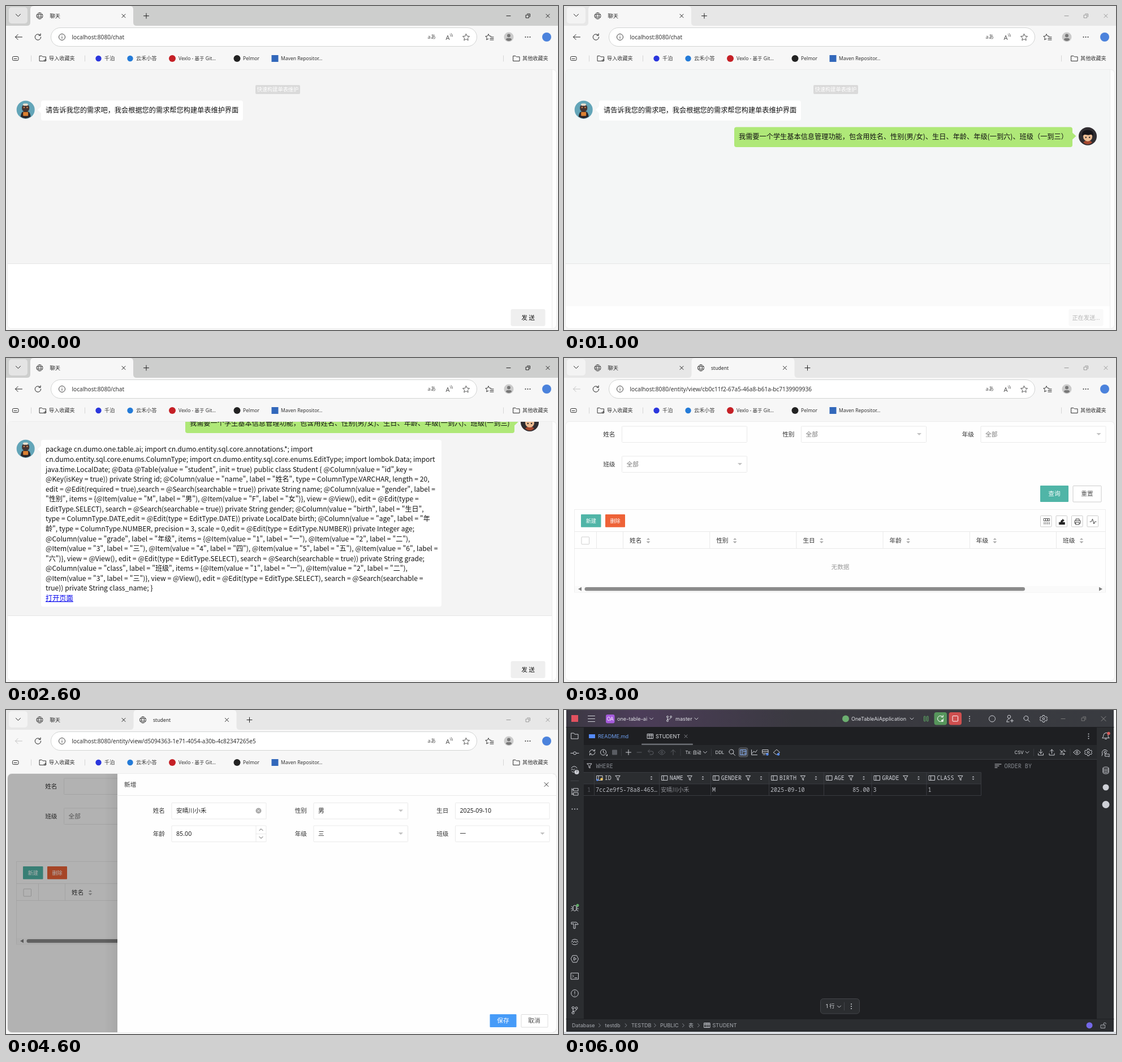
An HTML page that plays this animation: 976x574 px, repeating every 7 s.

```html
<!DOCTYPE html>
<html lang="zh-CN">
<head>
<meta charset="utf-8">
<title>Chat to table</title>
<style>
html, body { margin: 0; width: 100%; height: 100%; overflow: hidden; background: #f7f7f7; }
svg { display: block; font-family: "Noto Sans CJK SC", "Noto Sans CJK", sans-serif; }
.ui { font-family: "Noto Sans", "Noto Sans CJK SC", sans-serif; }
.ide { font-family: Inter, "Noto Sans CJK SC", sans-serif; }
.mono { font-family: "Noto Sans Mono", "Noto Sans CJK SC", monospace; }
.code { word-spacing: .2px; }
</style>
</head>
<body>
<svg id="stage" width="976" height="574" viewBox="0 0 976 574"></svg>
<script>
const MID = 'text-anchor="middle"', END = 'text-anchor="end"', UI = 'class="ui"', MONO = 'class="mono"';
const TEAL = '#50b5a7', LINE = '#e9e9e9', PERSON = '安晴川小禾';

// Text is placed by its visual centre line.
const T = (x, y, text, size = 10.67, fill = '#222', attrs = '') =>
  `<text x="${x}" y="${y + size * .37}" font-size="${size}" fill="${fill}" ${attrs}>${text}</text>`;
const R = (x, y, w, h, fill = 'none', r = 0, stroke = 'none') =>
  `<rect x="${x}" y="${y}" width="${w}" height="${h}" rx="${r}" fill="${fill}" stroke="${stroke}"/>`;
const C = (x, y, r, fill = 'none', stroke = 'none') =>
  `<circle cx="${x}" cy="${y}" r="${r}" fill="${fill}" stroke="${stroke}"/>`;
const P = (x, y, d, stroke = '#333', fill = 'none', w = 1) =>
  `<path transform="translate(${x} ${y})" d="${d}" stroke="${stroke}" fill="${fill}" stroke-width="${w}" stroke-linecap="round" stroke-linejoin="round"/>`;
const H = (x, y, w, color = LINE) => P(x, y, `M0 0h${w}`, color);
const V = (x, y, h, color = LINE) => P(x, y, `M0 0v${h}`, color);
const each = (list, f) => list.map(f).join('');

const D = {
  cross: 'M-3-3l6 6m0-6l-6 6', plus: 'M-4.5 0h9M0-4.5v9', minus: 'M-4 0h8', chevron: 'M-3-1.5l3 3 3-3',
  crumb: 'M-1.5-3l3 3-3 3', back: 'M6 0h-12l4.5-4.5m-4.5 4.5l4.5 4.5', folder: 'M-5.5-4.5h4l1.5 1.5h5.5v7.5h-11z',
  reload: 'M4.2-3A5.2 5.2 0 1 0 5.2 0M4.6-6v3.2h-3.2', globe: 'M-5.5 0a5.5 5.5 0 1 0 11 0a5.5 5.5 0 1 0-11 0M0-5.5c-3.4 3-3.4 8 0 11c3.4-3 3.4-8 0-11M-5-2h10M-5 2h10',
  star: 'M0-6l1.8 3.8 4.2.5-3.1 2.9.8 4.1L0 3.3l-3.7 2 .8-4.1L-6-1.7l4.2-.5z',
  restore: 'M-3.5-1.5h5v5h-5zM-1.5-3.5h5v5', down: 'M-4-2h8l-4 4z', up: 'M-3 1.5h6l-3-3z',
  search: 'M-5-1a4 4 0 1 0 8 0a4 4 0 1 0-8 0M2 2l3.5 3.5', funnel: 'M-4-4h8l-3 4v4l-2-1.2v-2.8z',
  branch: 'M-3-2v4M-3 1q6 0 6-3M-4.5-3.5a1.5 1.5 0 1 0 3 0a1.5 1.5 0 1 0-3 0M-4.5 3.5a1.5 1.5 0 1 0 3 0a1.5 1.5 0 1 0-3 0M1.5-3.5a1.5 1.5 0 1 0 3 0a1.5 1.5 0 1 0-3 0',
  grid: 'M-5-4h10v8h-10zM-5-1.5h10M-1.7-4v8M1.7-4v8', column: 'M-5-4h10v8h-10zM-2-4v8',
  gear: 'M-1.3-6h2.6l.6 2 1.4.8 2-.5 1.3 2.3-1.5 1.4 1.5 1.4-1.3 2.3-2-.5-1.4.8-.6 2h-2.6l-.6-2-1.4-.8-2 .5-1.3-2.3 1.5-1.4-1.5-1.4 1.3-2.3 2 .5 1.4-.8zM-1.8 0a1.8 1.8 0 1 0 3.6 0a1.8 1.8 0 1 0-3.6 0',
  eye: 'M-6 0q6-8.5 12 0q-6 8.5-12 0M-1.7 0a1.7 1.7 0 1 0 3.4 0a1.7 1.7 0 1 0-3.4 0',
  save: 'M0-5v7m-3-3l3 3 3-3M-4.5 2v3h9v-3', load: 'M0 2v-7m-3 3l3-3 3 3M-4.5 2v3h9v-3',
  list: 'M-5-3h11M-5 0h7M-5 3h4'
};

function windowButtons(y, color) {
  return P(888, y, 'M-3 0h7', color) + P(923, y, D.restore, color) + P(958, y, D.cross, color);
}

function tab(x, title, active) {
  const shape = active ? P(x, 0, 'M-6 35q6 0 6-6V6q0-6 6-6H176q6 0 6 6V29q0 6 6 6z', 'none', '#f7f7f7') : '';
  return shape + P(x + 16.5, 17.5, D.globe, '#444') + P(x + 165, 17.5, D.cross, '#222')
    + T(x + 34.5, 17.5, title, title === '聊天' ? 9.2 : 8.6, '#222', UI);
}

function browser(focused, url, tabs = 1) {
  const ink = '#333', bookmark = (x, text, size = 9.14) => T(x, 93, text, size, ink, UI);
  return R(0, 0, 976, 574, '#f7f7f7') + R(0, 0, 976, 35, focused ? '#cdcecd' : '#e7e7e7')
    + R(5, 2, 33, 29, focused ? '#e4e4e4' : '#f3f3f3', 5) + P(21.5, 16.5, 'M-4-2l4 4 4-4', '#222')
    + tab(43, '聊天', tabs === 1) + (tabs > 1 ? tab(225.5, 'student', true) : '')
    + P(65.5 + tabs * 182.5, 17.5, D.plus, '#222') + windowButtons(17.5, focused ? '#222' : '#999')
    + P(22.5, 55, D.back, tabs > 1 ? '#c4c4c4' : '#222') + P(56.5, 55, D.reload, '#222')
    + R(79.5, 38.5, 753, 33, '#fff', 16.5, '#d2d4d3')
    + C(99, 55, 5.5, 'none', '#444') + P(99, 55, 'M0-.5v3M0-2.6v.1', '#444')
    + T(116.5, 55, url, 10.1, '#333', UI) + T(745.5, 55, 'aあ', 9.2, '#555', UI) + T(777.5, 55.5, 'A', 11, '#555', UI)
    + P(785, 52, 'M0-2q2 1 2 4M2-3.5q2.5 2 2.5 5.5', '#666') + P(813.5, 55.5, D.star, '#555')
    + P(854, 55, 'M-1-5l1.5 3 3 .4M-1-5l-1.7 3.2-3.5.5 2.5 2.4-.6 3.8 3.3-1.8M3 0h5M2 2.5h6M2 5h6', '#333')
    + C(889, 55, 8.5, '#cbcbcb') + C(889, 52.5, 3, '#777') + P(889, 60, 'M-5 0q0-3 3-3h4q3 0 3 3q-5 4-10 0', 'none', '#777')
    + each([918.5, 922.5, 926.5], x => C(x, 55, 1, '#333')) + C(956, 55, 8, '#4b82dc')
    + R(11.5, 89.5, 10.5, 7, 'none', 2, ink) + H(14, 93.5, 5, ink)
    + each([44.5, 139.5, 879.5], x => V(x, 88, 10, '#d5d5d5'))
    + P(65, 93, D.folder, ink) + P(69, 96, 'M-2 0h4m-2-2l2 2-2 2', ink) + bookmark(76, '导入收藏夹')
    + C(163.5, 93, 5.2, '#2b36dd') + bookmark(174, '千泊')
    + C(219.5, 93, 5.2, '#247bd8') + bookmark(230, '云禾小答')
    + C(294, 93, 6, '#c52026') + bookmark(305, 'Vexlo - 基于 Git...', 8.5)
    + C(408.5, 93, 6, '#222') + bookmark(419, 'Pelmor', 8.6)
    + R(469.5, 87, 12, 12, '#3268bb') + bookmark(486, 'Maven Repositor...', 8.55)
    + P(902.5, 93, D.folder, ink) + bookmark(913, '其他收藏夹')
    + R(2.5, 112.5, 971, 459, '#fefefe', 7, '#ececec');
}

const inPage = content => `<clipPath id="page"><rect x="3" y="113" width="970" height="458" rx="7"/></clipPath><g clip-path="url(#page)">${content}</g>`;

const robot = y => C(34.7, y, 16, '#63a5b8') + P(34.7, y, 'M-9 12q1-10 9-10t9 10q-9 7-18 0', 'none', '#29262a')
  + R(28.2, y - 9, 13, 12, '#443331', 5) + R(30, y - 11, 9, 4, '#e8dfcf', 2)
  + C(32, y - 4, 1.3, '#d9894f') + C(37.5, y - 4, 1.3, '#d9894f') + R(30.2, y + 4, 9, 7, '#dc8131', 1);
const kid = y => C(926, y, 16, '#302d31') + P(926, y, 'M-8 11q8-8 16 0q-8 7-16 0', 'none', '#a4482f')
  + C(926, y + 1, 8, '#edbd94') + P(926, y, 'M-10-1q-1-10 10-10t10 10l-4-2-5 1-6-1z', 'none', '#17151a')
  + C(922.8, y + 2, 1.2, '#222') + C(929.2, y + 2, 1.2, '#222');
const leftBubble = (y, w, h) => R(62, y, w, h, '#fff', 4) + P(62, y + 16.5, 'M0-6l-6 6 6 6z', 'none', '#fff');
const rightBubble = (x, y) => R(x, y, 899 - x, 35.5, '#afe878', 4) + P(899, y + 16, 'M0-6l6.5 6-6.5 6z', 'none', '#afe878');
const request = '我需要一个学生基本信息管理功能，包含用姓名、性别(男/女)、生日、年龄、年级(一到六)、班级';

function chat(content, sending) {
  return browser(!sending, 'localhost:8080/chat') + inPage(
    R(3, 113, 962, 344, sending ? '#f4f6f6' : '#f4f4f4') + content
    + R(3, 457, 962, 114, '#fff') + (sending ? R(3, 457, 962, 75, '#fafafa') : '')
    + H(3, 456.5, 962, '#e6e6e6') + V(965.5, 113, 458, '#ededed')
    + R(892.5, 537, 61, 30, sending ? '#f9f9f9' : '#efefef', 3)
    + T(923, 552, sending ? '正在发送...' : '发 送', sending ? 10.2 : 10.67, sending ? '#b5b5b5' : '#111', MID));
}

const greeting = R(441, 140, 79, 16, '#dadada', 2) + T(480.5, 148, '快速构建单表维护', 9.2, '#fff', MID)
  + robot(183.7) + leftBubble(167.5, 357, 35.5)
  + T(70, 184.7, '请告诉我您的需求吧，我会根据您的需求帮您构建单表维护界面', 12.19, '#111');
const question = rightBubble(301, 214.5) + T(309, 231.7, request + '（一到三）', 12.19, '#111') + kid(230.7);

const reply = `package cn.dumo.one.table.ai; import cn.dumo.entity.sql.core.annotations.*; import
cn.dumo.entity.sql.core.enums.ColumnType; import cn.dumo.entity.sql.core.enums.EditType; import lombok.Data; import
java.time.LocalDate; @Data @Table(value = "student", init = true) public class Student { @Column(value = "id",key =
@Key(isKey = true)) private String id; @Column(value = "name", label = "姓名", type = ColumnType.VARCHAR, length = 20,
edit = @Edit(required = true),search = @Search(searchable = true)) private String name; @Column(value = "gender", label =
"性别", items = {@Item(value = "M", label = "男"), @Item(value = "F", label = "女")}, view = @View(), edit = @Edit(type =
EditType.SELECT), search = @Search(searchable = true)) private String gender; @Column(value = "birth", label = "生日",
type = ColumnType.DATE,edit = @Edit(type = EditType.DATE)) private LocalDate birth; @Column(value = "age", label = "年
龄", type = ColumnType.NUMBER, precision = 3, scale = 0,edit = @Edit(type = EditType.NUMBER)) private Integer age;
@Column(value = "grade", label = "年级", items = {@Item(value = "1", label = "一"), @Item(value = "2", label = "二"),
@Item(value = "3", label = "三"), @Item(value = "4", label = "四"), @Item(value = "5", label = "五"), @Item(value = "6", label =
"六")}, view = @View(), edit = @Edit(type = EditType.SELECT), search = @Search(searchable = true)) private String grade;
@Column(value = "class", label = "班级", items = {@Item(value = "1", label = "一"), @Item(value = "2", label = "二"),
@Item(value = "3", label = "三")}, view = @View(), edit = @Edit(type = EditType.SELECT), search = @Search(searchable =
true)) private String class_name; }`.split('\n');

const answer = () => rightBubble(317, 97.5) + T(325, 115.5, request + '(一到三)', 12.19, '#111') + kid(114)
  + robot(160.7) + leftBubble(145, 708, 295.5)
  + each(reply, (line, i) => T(70, 162 + i * 17.57, line, 12.07, '#111', 'class="code"'))
  + T(70, 425.5, '打开页面', 12.19, '#00e', 'text-decoration="underline"');

const box = (x, y, w, h = 28.5, stroke = LINE) => R(x + .5, y + .5, w, h, '#fff', 1, stroke);
const button = (x, y, w, h, text, fill, size = 10.67) => R(x, y, w, h, fill, 1) + T(x + w / 2, y + h / 2, text, size, '#fff', MID);
const field = (x, y, w, label, value = '', select = true, color = '#222') => T(x - 11.5, y + 14.3, label, 10.67, '#333', END)
  + box(x, y, w) + T(x + 8.5, y + 14.5, value, 10.67, color, UI) + (select ? P(x + w - 12, y + 14.5, D.down, 'none', '#c2c2c2') : '');
const checkbox = y => box(30.5, y, 13.5, 13, '#cfcfcf');

function table(filled) {
  const bottom = filled ? 379 : 415, bar = bottom - 5.7, rowEnd = filled ? 367.5 : 337.5;
  const columns = ['姓名', '性别', '生日', '年龄', '年级', '班级'], cells = [PERSON, '男', '2025-09-10', '85', '三'];
  const left = i => 104.5 + i * 153.2;
  const filters = field(102, 120.5, 221, '姓名', '', false) + field(419, 120.5, 221, '性别', '全部', true, '#777')
    + field(736.5, 120.5, 221, '年级', '全部', true, '#777') + field(102, 173.5, 221, '班级', '全部', true, '#777');
  const tools = each([842, 869.5, 897, 924.5], x => box(x, 279, 19.5, 19.5, '#ccc'))
    + P(853, 289.5, 'M-4.5-5h3v4h-3zM-1-5h3v4h-3zM3-5h2.5v4h-2.5zM-4 1.5v3.5M-1 1.5v3.5M2 1.5v3.5M5 1.5v3.5', '#444', 'none', .9)
    + P(880.5, 290, 'M-5 1h10v4h-10zM-2 1v-2q0-2 3-2v-2l3 3-3 2v1', '#222', '#222', .5)
    + P(908, 290, 'M-3-2v-3h6v3M-3 3h-2v-5h10v5h-2M-3 1h6v4h-6z', '#444')
    + P(935.5, 290, 'M-5.5 0h2.5l2-5 2.5 9 1.5-4h2.5', '#444');
  const header = each(columns, (name, i) => V(left(i), 308, rowEnd - 308)
    + T(left(i) + 11.5, 323.2, name, 10.67, '#333', 'font-weight="500"')
    + P(left(i) + 44.5, 320.5, D.up, 'none', '#aaa') + P(left(i) + 44.5, 326.3, 'M-3.5-1.5h7l-3.5 3.5z', 'none', '#aaa'));
  const shade = (x, dir) => each([1, 2, 3, 4], i => R(dir > 0 ? x : x - i, 308, i, 59.5, 'rgba(0,0,0,.018)'));
  const row = () => H(18.5, 367.5, 939) + checkbox(346.5) + T(81, 353, '1', 10, '#555', MID + ' ' + UI)
    + each(cells, (text, i) => T(left(i) + 11.5, 353, text, i > 1 && i < 4 ? 10 : 10.67, '#555', UI))
    + R(872, 308.5, 85, 58.5, '#fefefe') + H(872, 337.5, 85) + shade(872, -1) + shade(104.5, 1)
    + T(884, 323.2, '操作', 10.67, '#333', 'font-weight="500"')
    + button(884, 345, 27.5, 16.5, '删除', TEAL, 9.14) + button(919.5, 345, 27.5, 16.5, '编辑', TEAL, 9.14);
  return filters + button(842, 226, 50, 29, '查询', TEAL) + box(899.5, 226, 50, 28.5, '#ccc') + T(925, 240.5, '重置', 10.67, '#555', MID)
    + R(18.5, 268.5, 939, bottom - 268.5, 'none', 0, '#eee') + button(30, 277, 35.5, 22.7, '新建', TEAL, 9.14)
    + button(73, 277, 35, 22.7, '删除', '#ee6237', 9.14) + tools + H(18.5, 307.5, 939) + H(18.5, 337.5, 939)
    + V(57.5, 308, rowEnd - 308) + checkbox(316.5) + header
    + (filled ? row() : T(488.5, 370, '无数据', 10.67, '#999', MID))
    + R(19, bar - 5, 938, 10, '#fafafa') + R(36.5, bar - 3.3, 778.5, 6.6, '#8b8b8b', 3.3)
    + P(28, bar, 'M3-3.5v7l-6-3.5z', 'none', '#808080') + P(949, bar, 'M-3-3.5v7l6-3.5z', 'none', '#808080');
}

const drawer = () => R(3, 113, 970, 458, 'rgba(0,0,0,.3)')
  + each([...Array(12).keys()], i => R(197 - i * 2, 113, i * 2, 458, 'rgba(0,0,0,.009)'))
  + R(197, 113, 776, 458, '#fefefe') + T(209, 131.7, '新增', 10.67, '#333') + P(955.5, 132, 'M-3.5-3.5l7 7m0-7l-7 7', '#333') + H(197, 151.5, 776)
  + field(292.5, 164, 167, '姓名', PERSON, false) + C(446.5, 178.5, 5, '#aaa') + P(446.5, 178.5, 'M-1.7-1.7l3.4 3.4m0-3.4l-3.4 3.4', '#fff')
  + field(543.5, 164, 166.5, '性别', '男') + field(794, 164, 166.5, '生日', '2025-09-10', false)
  + field(292.5, 204.5, 167, '年龄', '85.00', false) + V(442, 205, 28.5) + H(442, 219.5, 17.5)
  + P(451, 212, 'M-3 1.5l3-3 3 3', '#555') + P(451, 226, D.chevron, '#555')
  + field(543.5, 204.5, 166.5, '年级', '三') + field(794, 204.5, 166.5, '班级', '一')
  + button(855.5, 539, 47, 23, '保存', '#469bf8') + box(910.5, 539, 47, 22.5, '#dcdcdc') + T(934, 550.5, '取消', 10.67, '#444', MID);

const entity = (id, content) => browser(false, 'localhost:8080/entity/view/' + id, 2) + inPage(content);

function ide() {
  const ink = '#ced0d6', dim = '#5a5d63', edge = '#393b40', panel = '#2b2d30';
  const icon = (x, y, d, color = ink, fill) => P(x, y, d, color, fill);
  const label = (x, y, s, size = 9.15, color = '#dfe1e5') => T(x, y, s, size, color);
  const dots = (x, y) => each([-4, 0, 4], d => C(x, y + d, 1, ink));
  const title = `<linearGradient id="bar"><stop stop-color="#3b3842"/><stop offset=".13" stop-color="#4c3d59"/><stop offset=".42" stop-color="#3a3940"/><stop offset="1" stop-color="#393b40"/></linearGradient>`
    + R(4, 0, 968, 30, 'url(#bar)') + R(13, 9, 12, 12, '#e2515f')
    + icon(48.5, 15.5, 'M-6-5h12M-6 0h12M-6 5h12') + R(74, 8, 15.5, 15.5, '#a65bdc', 3) + T(81.7, 15.7, 'OA', 8.5, '#fff', MID)
    + label(94, 15.5, 'one-table-ai') + icon(154.5, 15.5, D.chevron) + icon(186, 15.5, D.branch) + label(197, 15.5, 'master') + icon(234, 15.5, D.chevron)
    + C(498, 15.5, 6, '#6cae70') + label(508, 15.5, 'OneTableAiApplication') + icon(615, 15.5, D.chevron)
    + R(636.5, 11, 2.5, 9, 'none', 1, '#5fad65') + R(641.5, 11, 2.5, 9, 'none', 1, '#5fad65')
    + R(654.5, 4, 22.5, 22.5, '#57965c', 4) + icon(665.7, 15.3, D.reload, '#fff') + C(669, 19, 2, '#fff')
    + R(680.5, 4, 22.5, 22.5, '#cf4f4f', 4) + R(687, 10.5, 9.5, 9.5, 'none', 1, '#fff') + dots(717, 15.5)
    + C(757, 15.5, 5.5, 'none', ink) + C(787, 12, 2.8, 'none', ink) + icon(788, 18, 'M-5 3q0-5 4-5M-5 3h4M4-1.5v5M1.5 1h5')
    + icon(818, 15.5, D.search) + icon(848, 15.5, D.gear)
    + icon(883, 15.5, 'M-4 0h7', '#777') + icon(919, 15.5, D.restore, '#777') + icon(954, 15.5, 'M-4-4l8 8m0-8l-8 8', '#888');
  const side = icon(19, 46, 'M-6-5h4.5l1.5 2h6v8h-12z') + C(19, 76.5, 2.5, 'none', ink) + icon(19, 76.5, 'M-7 0h4M3 0h4')
    + icon(18, 105, 'M-5-2a5.5 5.5 0 0 1 10 0M-5 1l2-1.5 2 2 2-2M-4 4q2 2 4 1') + C(22.5, 110, 4, ink) + T(22.5, 110, '?', 6, panel, MID)
    + H(12, 125.5, 14, '#43454a') + icon(19, 145, 'M-5-6v11M-5-4h3M-5 4h3M-2-6h8v4.5h-8zM-2 1.5h8v4.5h-8z')
    + each([14.5, 19, 23.5], x => C(x, 175.5, 1, ink))
    + icon(19, 351, 'M-3-2q0-3 3-3t3 3v3q0 4-3 4t-3-4zM-6-3l3 2m-3.5 2h3.5m-3 4l3-2M6-3l-3 2m3.5 2h-3.5m3 4l-3-2') + C(24, 346, 2.5, '#5fad65')
    + icon(19, 381, 'M-6-2v-3h9l3 3v1h-4v-1h-1v8h-3v-8z') + icon(19, 411, 'M-5-3q5-4 10 0M-6 0l2-1.5 2 2.5 2-2.5 2 2.5 2-2 2 1M-5 3q5 4 10 0')
    + icon(19, 441, 'M-3.5-6h7l3 6-3 6h-7l-3-6zM-1.5-2.5v5l4-2.5z') + icon(19, 471.5, 'M-6.5-5.5h13v11h-13zM-4-2l2 2-2 2M0 3h4')
    + C(19, 502, 6.3, 'none', ink) + icon(19, 502, 'M0-3.5v4M0 3v.2', ink) + icon(19, 532, 'M-3-3v6M-3 2q6 0 6-4M-5-4.5a2 2 0 1 0 4 0a2 2 0 1 0-4 0M-5 4.5a2 2 0 1 0 4 0a2 2 0 1 0-4 0M1-4a2 2 0 1 0 4 0a2 2 0 1 0-4 0')
    + icon(958, 46, 'M-6 3.5q2-2 2-5t4-4 4 4 2 5zM-1.5 5.5h3') + C(963, 41.5, 2.7, '#db5c5c')
    + icon(957, 76, 'M-5 2a5 5 0 1 1 9-5M-5 2l-1 3M-2-1a2 2 0 1 0 4 0a2 2 0 1 0-4 0M0 2h7v5l-2-1h-5z')
    + icon(958, 107, 'M-5-4a5 2 0 1 0 10 0a5 2 0 1 0-10 0v8a5 2 0 0 0 10 0v-8M-5-1.3a5 2 0 0 0 10 0M-5 1.4a5 2 0 0 0 10 0')
    + C(958, 137, 5.5, ink) + C(958, 167.5, 6.5, ink);
  const tabs = R(44, 43, 11, 7, '#548af7') + label(60, 46.5, 'README.md', 9.15, '#6f9ff0') + icon(152.5, 46.5, D.grid) + label(162, 46.5, 'STUDENT')
    + icon(215.5, 46.5, 'M-2.5-2.5l5 5m0-5l-5 5', '#8a8c92') + R(137, 59.5, 91, 2.5, '#6a6d73', 1) + dots(927.5, 46.5);
  const tools = icon(50, 75, 'M-5 0a5 5 0 0 1 9-2.5M5 0a5 5 0 0 1-9 2.5M4.5-5v2.7h-2.7M-4.5 5v-2.7h2.7') + C(69.5, 75, 5, 'none', ink) + icon(69.5, 75, 'M0-3v3l2 1.5M5.5 6h1.5v-2z')
    + R(85, 70.5, 9, 9, dim, 1) + V(101.5, 69, 12, edge) + icon(114, 75, D.plus) + icon(133, 75, D.minus, dim)
    + icon(153, 75, 'M-4-2h6a3 3 0 0 1 0 6h-3M-1.5-5l-3 3 3 3', dim) + icon(173, 75, D.eye, dim) + icon(193, 75, 'M0 4.5v-9l-4 4m4-4l4 4', dim)
    + V(206, 69, 12, edge) + label(214.5, 75, 'Tx: 自动', 7.6) + icon(249.5, 75, D.chevron) + V(260.5, 69, 12, edge)
    + label(267.5, 75, 'DDL', 7.8) + icon(297, 75, D.search) + R(309, 67, 16, 16, '#43454a', 3, '#5f6269') + icon(317, 75, 'M-5-4.5h10v9h-10zM-2-4.5v9M0-1.5h5M2 2h3', '#8ab4f8')
    + icon(336.5, 75, 'M-5-4.5v9h10M-4 2l3-4 3 2 3-4') + icon(356, 75, 'M-5-4.5h10v6h-10zM-5-1.5h10M-4 4h4') + C(359.5, 78.5, 2.3, '#548af7')
    + icon(376, 75, 'M-5.5 0l5.5-5 5.5 5-5.5 4z') + C(379, 78.5, 2.3, '#548af7')
    + label(796.5, 75, 'CSV', 7.8) + icon(819, 75, D.chevron) + V(830.5, 69, 12, edge) + icon(843, 75, D.save) + icon(862.5, 75, D.load)
    + icon(882, 75, 'M-5-4l4 4m0-3v3h-3M5-2h-3v-3M-5 3h8m-2-2l2 2-2 2') + V(895, 69, 12, edge) + icon(907, 75, D.eye) + icon(927, 75, D.gear);
  const columns = [[53, 'ID'], [168, 'NAME'], [259, 'GENDER'], [362, 'BIRTH'], [459, 'AGE'], [543.5, 'GRADE'], [640.5, 'CLASS'], [737, '']];
  const values = ['7cc2e9f5-78a8-465…', PERSON, 'M', '2025-09-10', '85.00', '3', '1'];
  const mono = (x, y, s, color = '#bcbec4', attrs = '') => T(x, y, s, 10.1, color, MONO + ' ' + attrs);
  const value = (i, x) => i === 4 ? mono(540.5, 141.3, values[i], undefined, END)
    : mono(x + 3, 141.3, values[i], i === 1 ? '#8f9197' : undefined);
  const grid = R(35, 111, 702, 20, panel) + H(35, 110.5, 702, edge) + H(35, 131, 702, edge) + H(35, 151.5, 702, edge)
    + each(columns, ([x, name], i) => V(x + .5, 111, 40, edge) + (name && icon(x + 10, 120.5, D.column, ink)
      + (i ? '' : C(66.5, 122.5, 2.2, '#f2c55c') + C(59, 124, 1.8, '#548af7'))
      + mono(x + 18.7, 120.5, name, '#ced0d6') + icon(x + 30 + name.length * 6.1, 120.5, D.funnel)
      + icon(columns[i + 1][0] - 13.5, 120.5, 'M-2-1.2h4l-2-2zM-2 1.2h4l-2 2z', 'none', ink)
      + value(i, x)))
    + mono(41, 141.3, '1', dim);
  const crumbs = [[14, 'Database'], [72.5, 'testdb'], [119, 'TESTDB'], [170, 'PUBLIC'], [220, '表'], [262.5, 'STUDENT']];
  const footer = each(crumbs, ([x, s]) => label(x, 558.7, s, 9.1, '#a8abb1')) + each([63, 109.5, 161, 211, 238], x => icon(x, 558.7, D.crumb, '#868a91'))
    + icon(253, 558.5, D.grid) + C(929, 558.7, 5.5, '#7468e8') + icon(954, 559, 'M-4.5-1h7v5.5h-7zM0-1v-2q0-2 2.2-2t2.2 2M-1 1.5v.6', '#a8abb1')
    + R(453.5, 511.5, 69, 26.5, panel, 5, '#43454a') + label(463, 525, '1 行', 9.1) + icon(486.5, 525.5, D.chevron) + V(495.5, 518, 14, '#43454a') + dots(508, 525);
  return R(0, 0, 976, 574, '#fff') + R(0, 570, 976, 4, '#dcdfe4') + R(4, 0, 968, 570, panel) + R(35, 31, 907, 517, '#1e1f22')
    + R(35, 62, 907, 26, '#26282b') + H(35, 87.5, 907, edge) + H(4, 30.5, 968, '#1e1f22') + H(4, 547.5, 968, '#1e1f22')
    + `<g class="ide">${title + side + tabs + tools + grid + footer}</g>`
    + icon(45, 99, D.funnel) + icon(767, 99, D.list) + mono(56.5, 99.3, 'WHERE', '#868a91') + mono(778.5, 99.3, 'ORDER BY', '#868a91');
}

const savedId = 'd5094363-1e71-4054-a30b-4c82347265e5';
const scenes = [
  chat(greeting),
  chat(greeting + question, true),
  chat(answer()),
  entity('cb0c11f2-67a5-46a8-b61a-bc7139909936', table(false)),
  entity(savedId, table(false) + drawer()),
  entity(savedId, table(true)),
  ide()
];

const stage = document.getElementById('stage');
let shown = -1;
function draw() {
  const index = Math.floor(performance.now() / 1000) % scenes.length;
  if (index !== shown) stage.innerHTML = scenes[shown = index];
  requestAnimationFrame(draw);
}
draw();
</script>
</body>
</html>
```
